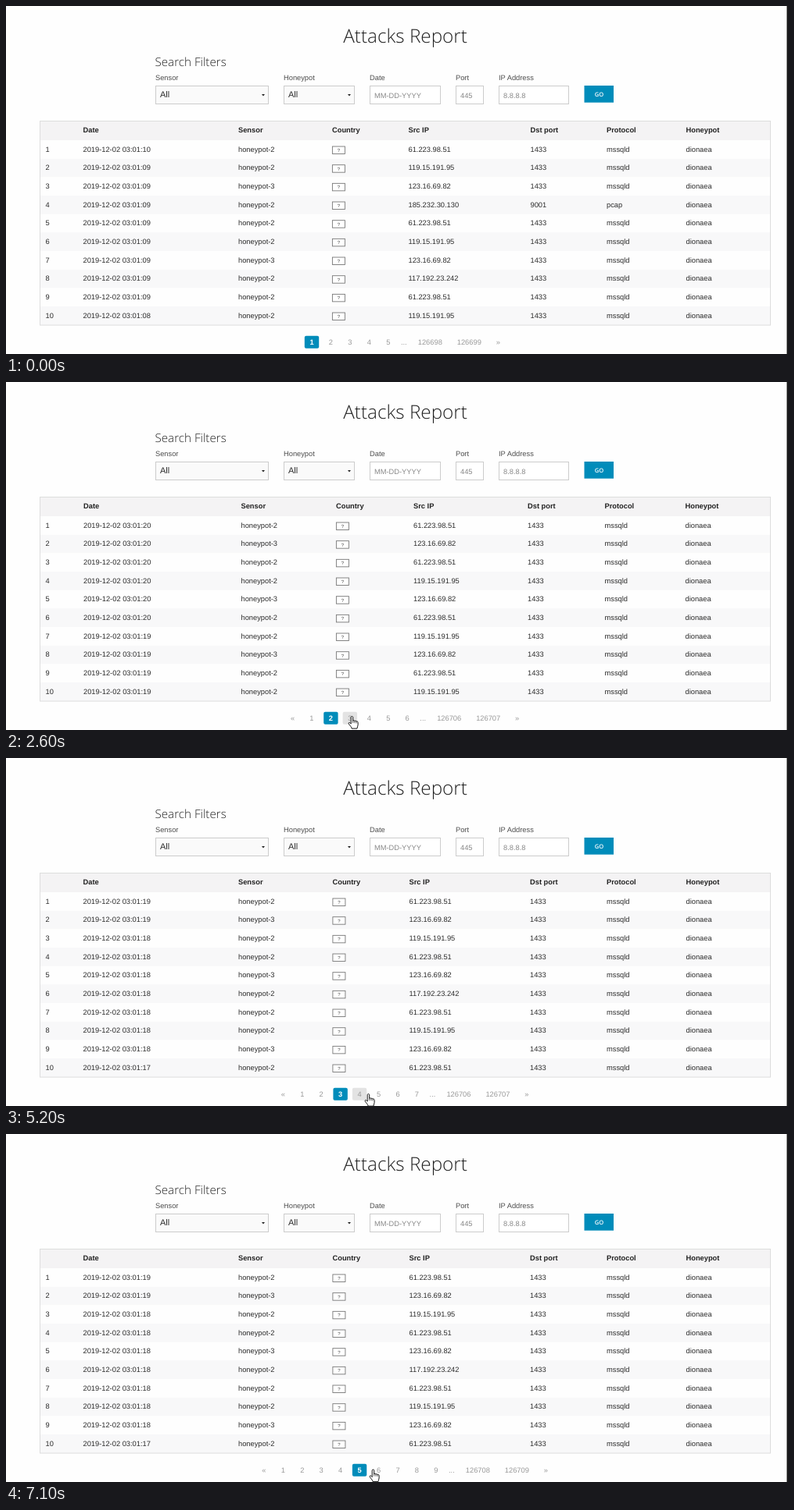
Write an HTML page that moves like this. It is 1000x446 px and loops after 7.2 s.

```html
<!DOCTYPE html>
<html lang="en">
<head>
<meta charset="utf-8">
<title>Attacks Report</title>
<style>
  html, body { margin: 0; width: 100%; height: 100%; overflow: hidden; background: #fefefe; }
  svg { display: block; width: 1000px; height: 446px; font: 9.3px "Liberation Sans", Arial, sans-serif; text-rendering: geometricPrecision; }
  .light { font-family: "Open Sans", sans-serif; font-weight: 300; fill: #222; }
  .label { fill: #4d4d4d; }
  .hint { fill: #888; }
  .cell { fill: #2b2b2b; }
  .head { fill: #222; font-weight: bold; }
  .page { fill: #999; text-anchor: middle; }
  .active { fill: #fff; font-weight: bold; text-anchor: middle; }
  .button { fill: #fff; font: 600 7.6px "Open Sans", sans-serif; text-anchor: middle; }
  .flag { fill: #444; font-size: 6px; text-anchor: middle; }
</style>
</head>
<body>
<svg viewBox="0 0 1000 446">
  <g id="form"></g>
  <g id="table"></g>
  <g id="pager"></g>
  <g id="arrow"><path d="M0 0V13L3 10.3 5 14.8 7 14 5 9.6H9Z" fill="#fff" stroke="#111" stroke-width=".9"/></g>
  <g id="hand"><path d="M-1.3 1.2C-1.3-.4 1.2-.4 1.2 1.2V6C1.6 4.8 3.3 5 3.4 6.2 4 5.3 5.4 5.6 5.5 6.7 6.2 6 7.6 6.5 7.6 7.8V11C7.6 13 6.5 13.6 6.4 15.6H-.4C-.5 13.7-2.6 12-4.2 9.6-5 8.2-3.3 7.2-2.2 8.5L-1.3 9.6Z" fill="#fff" stroke="#111" stroke-width="1" stroke-linejoin="round"/><path d="M1.2 6V8.5M3.4 6.2V8.7M5.5 6.7V8.9" stroke="#111" stroke-width=".7"/></g>
</svg>
<script>
const $ = id => document.getElementById(id);
const text = (x, y, s, cls, extra = '') => `<text x="${x}" y="${y}" class="${cls}" ${extra}>${s}</text>`;
const rect = (x, y, w, h, fill, extra = '') =>
  `<rect x="${x}" y="${y}" width="${w}" height="${h}" fill="${fill}" ${extra}/>`;

const LOOP = 7200;
const ROW = 23.67;
const IPS = { a: '61.223.98.51', b: '119.15.191.95', c: '123.16.69.82', d: '185.232.30.130', e: '117.192.23.242' };
const HEADINGS = ['', 'Date', 'Sensor', 'Country', 'Src IP', 'Dst port', 'Protocol', 'Honeypot'];

// Column positions, one address letter per row, and the seconds of each row
const newest = {
  cols: [50.5, 98.5, 297, 417, 514.5, 670.5, 768, 869.5],
  ips: 'abcdabceab', seconds: i => i === 0 ? '10' : i < 9 ? '09' : '08'
};
const even = {
  cols: [50.5, 99, 300.5, 422, 521, 667, 765.5, 868.5],
  ips: 'acabcabcab', seconds: i => i < 6 ? '20' : '19'
};
const odd = {
  cols: [50.5, 98.5, 297, 417.5, 515.5, 670, 768, 869.5],
  ips: 'acbaceabca', seconds: i => i < 2 ? '19' : i < 9 ? '18' : '17'
};
const PAGES = [
  { from: 0, rows: newest, total: 126699 },
  { from: 2000, rows: even, total: 126707 },
  { from: 3700, rows: odd, total: 126707 },
  { from: 5300, rows: even, total: 126709 },
  { from: 6600, rows: odd, total: 126709 }
];
const HOVERS = [[1100, 2000, 2], [2500, 3700, 3], [4400, 5300, 4], [5900, 6600, 5]];

// Pointer tip: time, x, y
const PATH = [
  [500, 992, 340], [1100, 421.5, 428.5], [2300, 421.5, 428.5], [2600, 442.5, 428.5],
  [2800, 446.5, 430], [4200, 446.5, 430], [4600, 463.5, 430.5], [5700, 463.5, 430.5],
  [6000, 469.5, 430], [LOOP, 469.5, 430]
];

function drawForm() {
  const field = (x, w, label, value, select) =>
    text(x, 95, label, 'label') +
    rect(x + .5, 102.5, w - 1, 23, select ? '#fafafa' : '#fff', 'stroke="#ccc"') +
    (select
      ? text(x + 6, 117, value, 'cell', 'font-size="11"') +
        `<path d="M${x + w - 9} 113h4l-2 2.5z" fill="#222"/>`
      : text(x + 6, 117.5, value, 'hint'));
  $('form').innerHTML =
    rect(998.5, 0, 1.5, 446, '#111') +
    text(510.6, 46.5, 'Attacks Report', 'light', 'font-size="24.3" text-anchor="middle"') +
    text(190.5, 77, 'Search Filters', 'light', 'font-size="15.2"') +
    field(191, 145, 'Sensor', 'All', true) +
    field(355, 91, 'Honeypot', 'All', true) +
    field(465, 91, 'Date', 'MM-DD-YYYY') +
    field(575, 36, 'Port', '445') +
    field(630, 90, 'IP Address', '8.8.8.8') +
    rect(739.5, 102, 37.5, 21.7, '#008cba') +
    text(758.5, 115.5, 'GO', 'button');
}

function drawTable({ cols, ips, seconds }) {
  let out = rect(43.5, 147.5, 934, 261.5, '#fefefe') + rect(43.5, 147.5, 934, 24.5, '#f4f3f4');
  HEADINGS.forEach((h, c) => out += text(cols[c], 162.4, h, 'head'));
  [...ips].forEach((key, i) => {
    const top = 172 + i * ROW, base = top + 14.8;
    if (i % 2) out += rect(43.5, top, 934, ROW, '#f8f8f9');
    const capture = key === 'd';
    const cells = [i + 1, `2019-12-02 03:01:${seconds(i)}`, `honeypot-${key === 'c' ? 3 : 2}`, '',
      IPS[key], capture ? 9001 : 1433, capture ? 'pcap' : 'mssqld', 'dionaea'];
    cells.forEach((s, c) => out += text(cols[c], base, s, 'cell'));
    out += rect(cols[3] + .4, top + 8, 16, 9.5, '#fff', 'stroke="#777" stroke-width=".9"') +
      text(cols[3] + 8.4, top + 15, '?', 'flag');
  });
  $('table').innerHTML = out + rect(43.5, 147.5, 934, 261.5, 'none', 'stroke="#ddd"');
}

function drawPager(page, total, hover) {
  const step = 24.45;
  const first = page === 1 ? 391 : 415.4 - step / 2 * page;
  const last = first + (page + 3) * step;
  const item = (x, s, cls = 'page') => text(x, 434.3, s, cls);
  const chip = (x, fill) => rect(x - 9.2, 422.7, 18.4, 16, fill, 'rx="2"');
  let out = page > 1 ? item(first - step, '«') : '';
  for (let n = 1; n <= page + 4; n++) {
    const x = first + (n - 1) * step;
    if (n === page) out += chip(x, '#008cba');
    else if (n === hover) out += chip(x, '#e3e3e3');
    out += item(x, n, n === page ? 'active' : 'page');
  }
  $('pager').innerHTML = out + item(last + 20, '...') + item(last + 53.5, total - 1) +
    item(last + 103.5, total) + item(last + 140.5, '»');
}

function placePointer(t) {
  const visible = t >= PATH[0][0], overLink = t >= 1100;
  $('arrow').style.display = visible && !overLink ? '' : 'none';
  $('hand').style.display = overLink ? '' : 'none';
  if (!visible) return;
  const k = PATH.findIndex(p => p[0] > t);
  const [t0, x0, y0] = PATH[k - 1], [t1, x1, y1] = PATH[k];
  const u = (t - t0) / (t1 - t0), ease = u * (2 - u);
  const move = `translate(${x0 + (x1 - x0) * ease} ${y0 + (y1 - y0) * ease})`;
  $('arrow').setAttribute('transform', move);
  $('hand').setAttribute('transform', move);
}

let shownRows, shownPager;
function render(time) {
  const t = Math.floor(time % LOOP / 100) * 100;
  const page = PAGES.filter(p => p.from <= t).length;
  const { rows, total } = PAGES[page - 1];
  const hover = (HOVERS.find(([a, b]) => t >= a && t < b) || [])[2] || 0;
  if (rows !== shownRows) drawTable(shownRows = rows);
  const pagerKey = page + '/' + hover;
  if (pagerKey !== shownPager) drawPager(page, total, hover), shownPager = pagerKey;
  placePointer(t);
}

drawForm();
const start = performance.now();
(function tick() {
  render(performance.now() - start);
  requestAnimationFrame(tick);
})();
</script>
</body>
</html>
```
